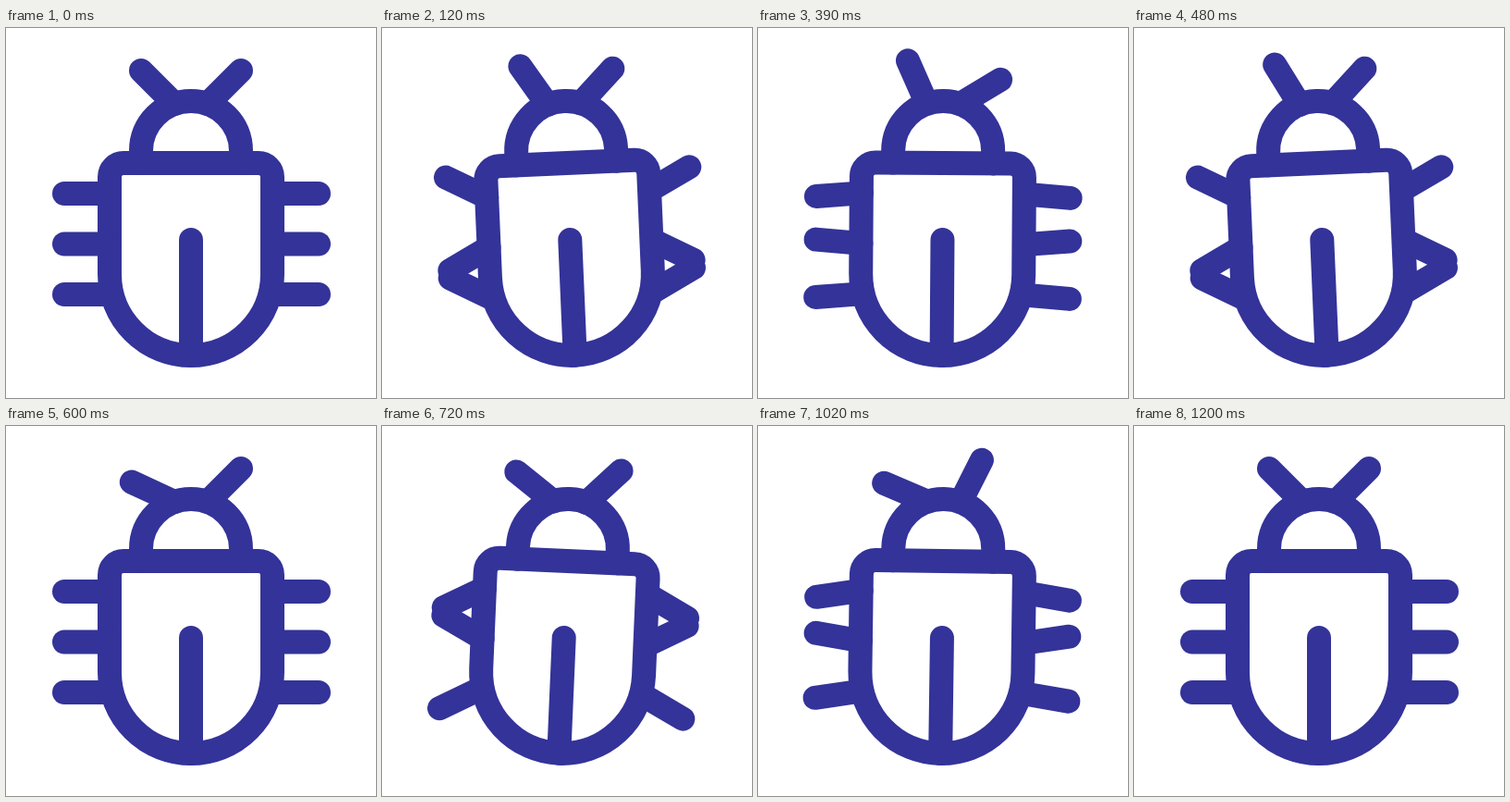
Recreate the animation shown at these times as an HTML page. Size 400 by 400 pixels, loop 1.23 s.

```html
<!DOCTYPE html>
<html lang="en">
<head>
<meta charset="utf-8">
<title>Crawling bug</title>
<style>
  html, body { margin: 0; width: 100%; height: 100%; overflow: hidden; background: #fff; }
  svg { display: block; width: 100%; height: 100%; }
  #bug { fill: none; stroke: #339; stroke-width: 26; stroke-linecap: round; }
</style>
</head>
<body>
<svg viewBox="0 0 400 400">
  <g id="bug">
    <path d="M112 161a15 15 0 0 1 15-15H273a15 15 0 0 1 15 15V266a88 88 0 0 1-176 0Z"/>
    <path d="M146 146V133a54 54 0 0 1 108 0V146"/>
    <path d="M200 229V354"/>
  </g>
</svg>
<script>
const LOOP = 1230, STEP = 30, SPAN = 1200;
const bug = document.getElementById('bug');

// A limb is a line that swings around its first point.
function limb(x, y, x2, y2) {
  const el = document.createElementNS('http://www.w3.org/2000/svg', 'path');
  el.setAttribute('d', `M${x} ${y}L${x2} ${y2}`);
  bug.append(el);
  return angle => el.setAttribute('transform', `rotate(${angle} ${x} ${y})`);
}

const legs = [179, 233.5, 288].flatMap((y, i) => {
  const dir = i % 2 ? -1 : 1;
  return [
    { turn: limb(112, y, 63, y), dir },
    { turn: limb(289, y, 338, y), dir: -dir }
  ];
});
const leftFeeler = limb(182, 82, 146, 46);
const rightFeeler = limb(218, 82, 254, 46);

// [time, angle] extremes of the left feeler
const sweep = [[0, 0], [60, 24], [240, -24], [420, 24], [640, -24],
               [850, 24], [1040, -24], [SPAN, 0]];

const wave = (t, cycles) => Math.sin(2 * Math.PI * cycles * t / SPAN);

function tween(keys, t) {
  const i = Math.max(1, keys.findIndex(k => k[0] >= t));
  const [t0, a] = keys[i - 1], [t1, b] = keys[i];
  return a + (b - a) * (1 - Math.cos(Math.PI * (t - t0) / (t1 - t0))) / 2;
}

function pose(t) {
  const swing = wave(t, 3);
  bug.setAttribute('transform', `rotate(${-2.6 * swing} 200 153)`);
  legs.forEach(leg => leg.turn(29.5 * leg.dir * swing));
  leftFeeler(tween(sweep, t));
  rightFeeler(-19 * wave(t, 5));
}

function tick() {
  pose(Math.floor(performance.now() % LOOP / STEP) * STEP);
  requestAnimationFrame(tick);
}
tick();
</script>
</body>
</html>
```
